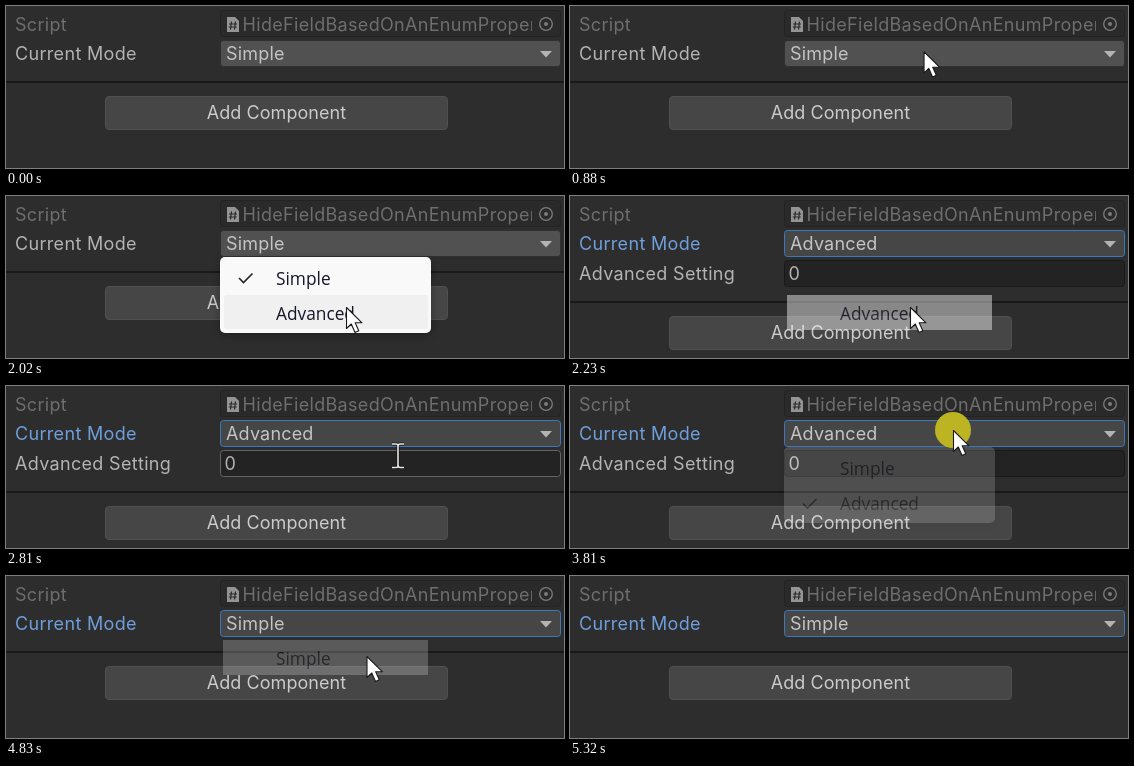
Recreate the animation shown at these times as an HTML page. Size 558 by 162 pixels, loop 5860 ms.

```html
<!DOCTYPE html>
<html lang="en">
<head>
<meta charset="utf-8">
<title>Inspector dropdown</title>
<style>
  html, body { margin: 0; width: 100%; height: 100%; overflow: hidden; background: #2d2d2d; }
  svg { display: block; width: 558px; height: 162px; }
  text { font: 18px Inter, sans-serif; letter-spacing: .32px; fill: #b4b4b4; white-space: pre; }
  .dim { fill: #6e6e6e; }
  #mode { letter-spacing: .18px; fill: #c4c4c4; }
  #footer text { letter-spacing: .06px; fill: #cbcbcb; }
  .menu text { font: 17.3px "Open Sans", sans-serif; letter-spacing: 0; fill: #17172a; }
  .check { fill: none; stroke: #222; stroke-width: 1.6; }
</style>
</head>
<body>
<svg viewBox="0 0 558 162">
  <defs>
    <clipPath id="nameClip"><rect x="236" y="5" width="290" height="26"/></clipPath>
    <filter id="soft" x="-10%" y="-20%" width="120%" height="150%"><feGaussianBlur stdDeviation="4"/></filter>
    <path id="caret" fill="none" d="M-6-12H-2Q0-12 0-9.5Q0-12 2-12H6M0-10V10M-6 11.5H-2Q0 11.5 0 9Q0 11.5 2 11.5H6"/>
  </defs>
  <rect width="558" height="162" fill="#2d2d2d"/>

  <text class="dim" x="9" y="24.5">Script</text>
  <rect x="214.5" y="4.5" width="340" height="26" rx="3" fill="#2a2a2a" stroke="#232323"/>
  <path d="M221 11H229L233 15V26H221Z" fill="#949494"/>
  <path d="M225.5 15.5L224.5 23.5M229.5 15.5L228.5 23.5M223 18H231M222.7 21H230.7" stroke="#2a2a2a" stroke-width="1.2"/>
  <text class="dim" x="236.5" y="24.5" clip-path="url(#nameClip)">HideFieldBasedOnAnEnumProperty</text>
  <circle cx="540" cy="18" r="6.3" fill="none" stroke="#7c7c7c" stroke-width="1.3"/>
  <circle cx="540" cy="18" r="2" fill="#7c7c7c"/>

  <text id="label" x="9" y="54">Current Mode</text>
  <rect id="drop" x="214.5" y="34.5" width="340" height="26" rx="3"/>
  <text id="mode" x="220" y="54"></text>
  <path d="M534 45H546L540 51.5Z" fill="#b4b4b4"/>

  <g id="setting">
    <text x="9" y="84">Advanced Setting</text>
    <rect id="field" x="214.5" y="64.5" width="340" height="26" rx="3" fill="#232323"/>
    <text x="218.5" y="84">0</text>
  </g>

  <g id="footer">
    <rect y="75" width="558" height="2" fill="#191919"/>
    <rect x="99.5" y="90.5" width="342" height="33" rx="3.5" fill="#464646" stroke="#505050"/>
    <text x="270.5" y="113" text-anchor="middle">Add Component</text>
  </g>

  <g id="popup" class="menu">
    <rect x="214" y="64" width="211" height="75" rx="5" fill="#000" opacity=".3" filter="url(#soft)"/>
    <rect x="214" y="61" width="211" height="76" rx="5" fill="#f9f9f9"/>
    <rect id="hover" x="218" width="204" height="34" rx="3" fill="#f0f0f0"/>
    <path id="tick" class="check" d="M233 82L237.5 86.5L246.5 77.5"/>
    <text x="270" y="89">Simple</text>
    <text x="270" y="124">Advanced</text>
  </g>

  <g id="flash" class="menu">
    <rect x="217" y="99" width="205" height="35" fill="#f4f4f4"/>
    <text id="picked" x="270" y="124"></text>
  </g>

  <circle id="click" r="18" fill="#bdb424"/>
  <path id="arrow" d="M.5 .5V21.5L5.3 17L9 25.5L12.8 23.8L9.2 15.8H16Z" fill="#fff" stroke="#1a1a1a" stroke-width="1.1" stroke-linejoin="round"/>
  <g id="beam">
    <use href="#caret" stroke="#151515" stroke-width="3"/>
    <use href="#caret" stroke="#e6e6e6" stroke-width="1.6"/>
  </g>
</svg>
<script>
const LOOP = 5860, TICK = 70, PRESS = 130, REACT = 60, FADE = 260;
const ENTER = 530, LEAVE = 5320;
const el = {};
document.querySelectorAll('[id]').forEach(n => el[n.id] = n);

const easeOut = p => 1 - (1 - p) ** 2;
const speedUp = p => 1 - (1 - p) ** .6;

const home = { x: 302, y: 130 };
const stops = [
  { from: ENTER, to: 950, x: 355, y: 43 },
  { from: 1410, to: 2020, x: 340, y: 111 },
  { from: 2230, to: 2700, x: 392, y: 70 },
  { from: 3270, to: 3610, x: 383, y: 44 },
  { from: 4010, to: 4430, x: 360.5, y: 80 },
  { from: 4770, to: LEAVE, x: 410, y: 165, ease: speedUp }
];
// each visit opens the menu, then picks an entry
const visits = [
  { open: 1150, pick: 2090, value: 'Advanced' },
  { open: 3740, pick: 4630, value: 'Simple' }
];

const within = (t, start, length) => t >= start && t < start + length;
const show = (node, on) => node.style.display = on ? '' : 'none';
const place = (node, x, y) => node.setAttribute('transform', `translate(${x} ${y})`);

function pointer(t) {
  let { x, y } = home;
  for (const s of stops) {
    if (t < s.from) break;
    const held = t < s.to ? Math.floor((t - s.from) / TICK) * TICK : s.to - s.from;
    const p = (s.ease || easeOut)(held / (s.to - s.from));
    x += (s.x - x) * p;
    y += (s.y - y) * p;
  }
  return { x, y };
}

function menuState(t) {
  const state = { value: 'Simple', focused: false, popup: 0, flash: 0, pressed: false };
  for (const { open, pick, value } of visits) {
    const closed = pick + REACT;
    if (within(t, open, PRESS) || within(t, pick, PRESS)) state.pressed = true;
    if (t >= open && t < closed) state.popup = Math.min(1, (t - open) / PRESS) ** 3;
    if (t >= closed) {
      state.value = value;
      state.focused = true;
      state.flash = Math.max(0, 1 - (t - pick) / FADE);
    }
  }
  return state;
}

function render(t) {
  const { x, y } = pointer(t);
  const { value, focused, popup, flash, pressed } = menuState(t);
  const visible = t >= ENTER && t < LEAVE;
  const advanced = value === 'Advanced';
  const inField = advanced && !popup && y >= 64 && y < 92;

  el.label.style.fill = focused ? '#6f9fdc' : '';
  el.drop.setAttribute('fill', focused ? '#464646' : '#515151');
  el.drop.setAttribute('stroke', focused ? '#3a79bb' : '#303030');
  el.mode.textContent = el.picked.textContent = value;
  el.field.setAttribute('stroke', inField ? '#656565' : '#191919');
  show(el.setting, advanced);
  place(el.footer, 0, advanced ? 30 : 0);

  show(el.popup, popup > 0);
  el.popup.setAttribute('opacity', popup);
  place(el.tick, 0, advanced ? 35.5 : 0);
  show(el.hover, y > 64);
  el.hover.setAttribute('y', y < 99 ? 65 : 99);

  show(el.flash, flash > 0);
  el.flash.setAttribute('opacity', flash);
  place(el.flash, 0, advanced ? 0 : -35);

  show(el.click, pressed);
  show(el.arrow, visible && !inField);
  show(el.beam, visible && inField);
  for (const node of [el.click, el.arrow, el.beam]) place(node, x, y);
}

const begin = performance.now();
function frame() {
  render((performance.now() - begin) % LOOP);
  requestAnimationFrame(frame);
}
frame();
</script>
</body>
</html>
```
